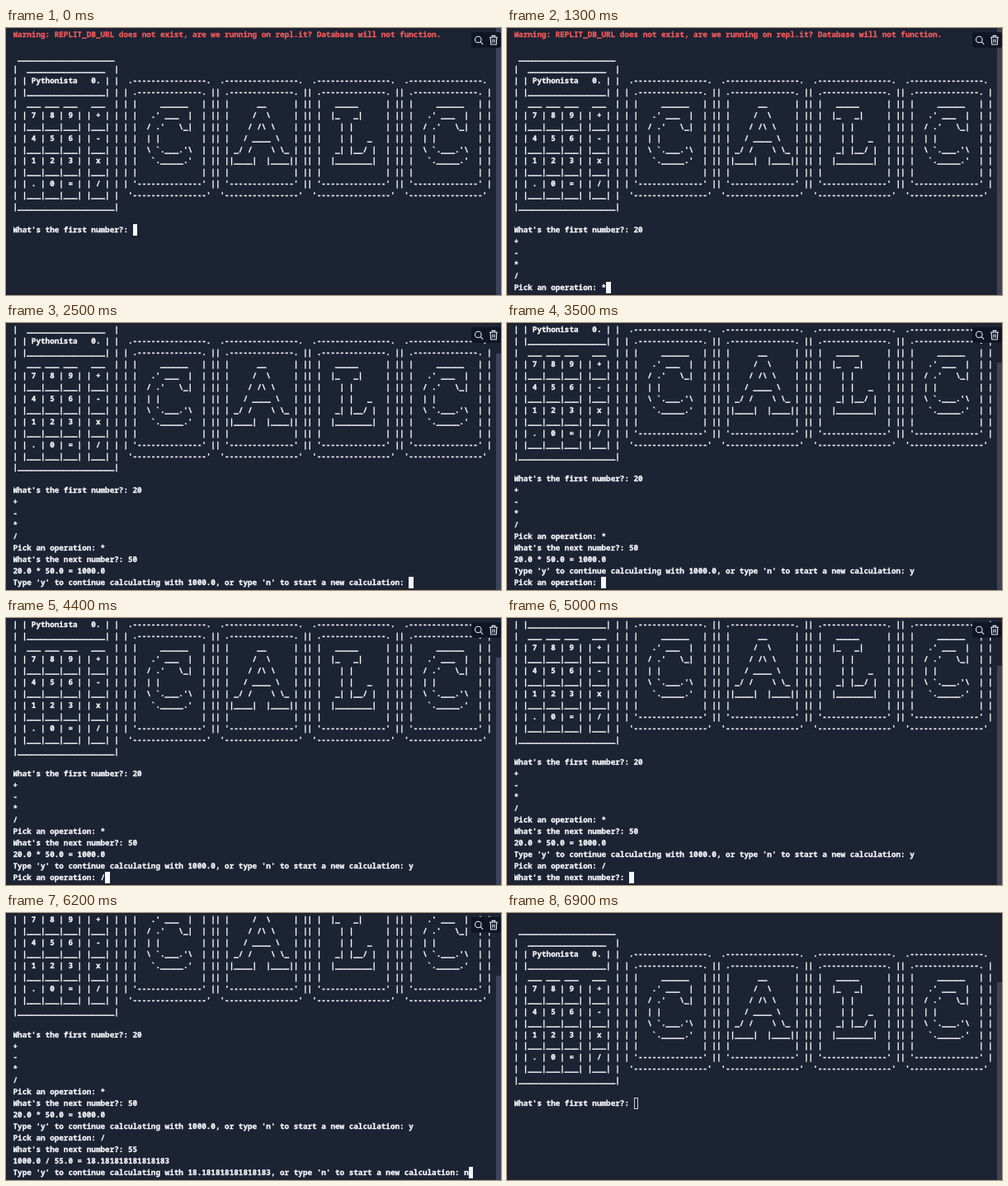
Animation of 600x324 px, one loop 7000 ms. Source, as an HTML page:

```html
<!DOCTYPE html>
<html lang="en">
<head>
<meta charset="utf-8">
<title>Terminal calculator</title>
<style>
  html, body { margin: 0; width: 100%; height: 100%; overflow: hidden; background: #1c2333; }
  #screen { position: absolute; left: 8.5px; top: 1px; width: 584px; height: 323px; overflow: hidden; }
  #page {
    position: absolute; left: 0; top: 0; margin: 0; color: #f5f9fc;
    font: 600 9.3px/13.95px "Noto Sans Mono", monospace;
    -webkit-text-stroke: .3px;
    font-variant-ligatures: none; text-rendering: geometricPrecision;
  }
  #warning { color: #f25a5a; }
  #cursor { position: absolute; box-sizing: border-box; width: 1ch; height: 13.95px; background: #f5f9fc; }
  #cursor.blurred { background: none; border: 1px solid #c9cfda; }
  #thumb { position: absolute; left: 594px; width: 6px; bottom: 0; background: #3c445c; }
  #tools { position: absolute; left: 564px; top: 5px; }
</style>
</head>
<body>
<template id="logo">
 _____________________
|  _________________  |
| | Pythonista   0. | |  .----------------.  .----------------.  .----------------.  .----------------.
| |_________________| | | .--------------. || .--------------. || .--------------. || .--------------. |
|  ___ ___ ___   ___  | | |     ______   | || |      __      | || |   _____      | || |     ______   | |
| | 7 | 8 | 9 | | + | | | |   .' ___  |  | || |     /  \     | || |  |_   _|     | || |   .' ___  |  | |
| |___|___|___| |___| | | |  / .'   \_|  | || |    / /\ \    | || |    | |       | || |  / .'   \_|  | |
| | 4 | 5 | 6 | | - | | | |  | |         | || |   / ____ \   | || |    | |   _   | || |  | |         | |
| |___|___|___| |___| | | |  \ `.___.'\  | || | _/ /    \ \_ | || |   _| |__/ |  | || |  \ `.___.'\  | |
| | 1 | 2 | 3 | | x | | | |   `._____.'  | || ||____|  |____|| || |  |________|  | || |   `._____.'  | |
| |___|___|___| |___| | | |              | || |              | || |              | || |              | |
| | . | 0 | = | | / | | | '--------------' || '--------------' || '--------------' || '--------------' |
| |___|___|___| |___| |  '----------------'  '----------------'  '----------------'  '----------------'
|_____________________|
</template>

<div id="screen"><pre id="page"><span id="warning"></span><span id="output"></span><i id="cursor"></i></pre></div>
<div id="thumb"></div>
<svg id="tools" width="36" height="19" fill="none" stroke="#e6eaf0" stroke-width="1.1">
  <rect width="18" height="19" rx="3" fill="#0e1525" stroke="none"/>
  <rect x="18" width="18" height="19" rx="3" fill="#0e1525" stroke="none"/>
  <circle cx="8.3" cy="9" r="3.8"/>
  <path d="M11 11.7l3.2 3.2M22 6.3h10M25.2 6v-1.6h3.6V6M23.2 6.5l.5 8.5h6.6l.5-8.5M25.9 8.6v4.2M28.1 8.6v4.2"/>
</svg>

<script>
const LOOP = 7000, CLEAR = 6400, BLUR = 6700;
const ROWS = 23, ROW_HEIGHT = 13.95, HEIGHT = 324;
const WARNING = "Warning: REPLIT_DB_URL does not exist, are we running on repl.it? Database will not function.\n";
const FIRST = "\nWhat's the first number?: ";
const PICK = "\nPick an operation: ";
const NEXT = "\nWhat's the next number?: ";
const again = n => `\nType 'y' to continue calculating with ${n}, or type 'n' to start a new calculation: `;

// Keystrokes and program replies: [time in ms, text]
const session = [
  [0, FIRST], [300, "2"], [500, "0"],
  [700, "\n+\n-\n*\n/" + PICK], [1200, "*"],
  [1500, NEXT], [1800, "5"], [2000, "0"],
  [2500, "\n20.0 * 50.0 = 1000.0" + again("1000.0")], [3000, "y"],
  [3400, PICK], [4000, "/"],
  [4500, NEXT], [5200, "5"], [5400, "5"],
  [5600, "\n1000.0 / 55.0 = 18.181818181818183" + again("18.181818181818183")], [6000, "n"]
];

const el = id => document.getElementById(id);
const [page, warning, output, cursor, thumb, tools] =
  ["page", "warning", "output", "cursor", "thumb", "tools"].map(el);
const logo = el("logo").content.textContent;

function setText(node, text) {
  if (node.textContent !== text) node.textContent = text;
}

function draw(t) {
  const cleared = t >= CLEAR, blurred = t >= BLUR;
  const head = cleared ? "" : WARNING;
  const body = logo + (cleared ? FIRST : session.filter(([at]) => at <= t).map(([, s]) => s).join(""));
  const lines = (head + body).split("\n");
  const scroll = Math.max(0, lines.length - ROWS);
  const history = cleared ? 8 : scroll;

  setText(warning, head);
  setText(output, body);
  page.style.top = -scroll * ROW_HEIGHT + "px";
  cursor.style.left = lines.at(-1).length + "ch";
  cursor.style.top = (lines.length - 1) * ROW_HEIGHT + "px";
  cursor.className = blurred ? "blurred" : "";
  thumb.style.top = HEIGHT * history / (history + ROWS) + "px";
  tools.style.display = blurred ? "none" : "block";
}

const start = performance.now();
function tick() {
  draw((performance.now() - start) % LOOP);
  requestAnimationFrame(tick);
}
tick();
</script>
</body>
</html>
```
